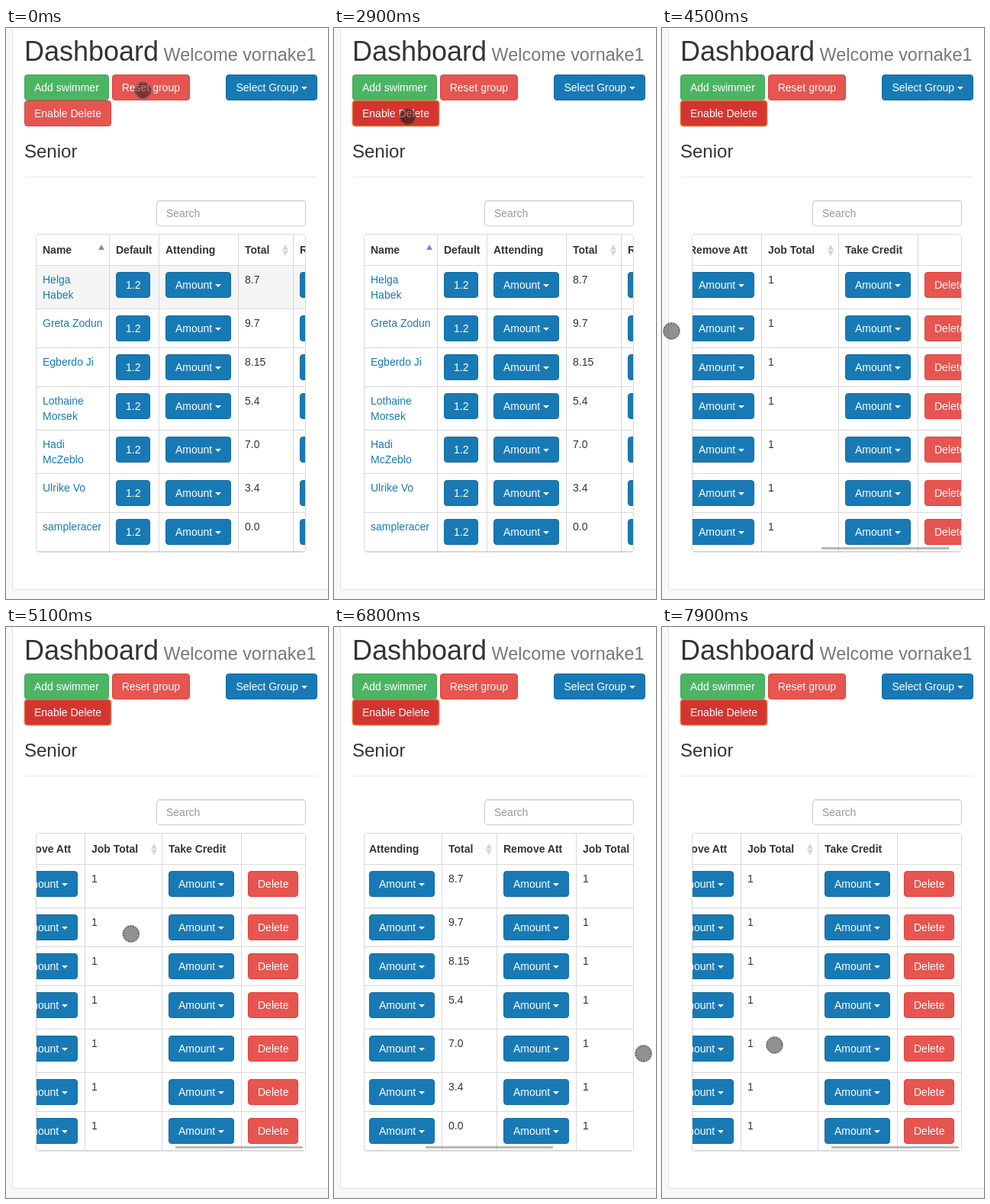
Recreate the animation shown at these times as an HTML page. Size 422x749 px, loop 8000 ms.

```html
<!DOCTYPE html>
<html lang="en">
<head>
<meta charset="utf-8">
<title>Dashboard</title>
<style>
  * { box-sizing: border-box; }
  html, body { margin: 0; width: 100%; height: 100%; overflow: hidden; background: #f8f8f8; }
  body { position: relative; font: 14px/20px "Liberation Sans", Arial, sans-serif; color: #333; }
  body > *, #table, #table > *, #thumb { position: absolute; }
  .page { left: 8px; top: -5px; width: 430px; height: 742px; background: #fff; border: 1px solid #e2e2e2; }
  h1, h3 { margin: 0; left: 24px; font-weight: 400; line-height: 1.1; white-space: nowrap; }
  h1 { top: 11.4px; font-size: 36px; }
  h1 small { font-size: 65%; line-height: 1; color: #777; }
  h3 { top: 149px; font-size: 24px; }
  .rule { left: 24px; top: 195px; width: 384px; height: 1px; background: #eaeaea; }
  .actions { left: 24px; top: 61px; width: 384px; }
  .search { left: 197px; top: 226px; width: 196px; height: 34px; padding: 6px 12px; border: 1px solid #ccc;
    border-radius: 4px; color: #999; box-shadow: inset 0 1px 1px rgba(0,0,0,.075); }
  .btn { display: inline-block; vertical-align: middle; height: 34px; padding: 6px 12px;
    border: 1px solid; border-radius: 4px; color: #fff; white-space: nowrap; }
  .right { float: right; }
  .green { background: #4bb563; border-color: #42a359; }
  .red { background: #e75550; border-color: #e2403b; }
  .blue { background: #187ab5; border-color: #146a9e; }
  .red.active { background: #d53530; border-color: #e0783c; box-shadow: 0 0 0 1px rgba(229,151,60,.5); }
  .caret { display: inline-block; vertical-align: middle;
    border: 4px solid transparent; border-top-color: #fff; border-bottom: 0; }
  .frame { left: 39px; top: 270px; width: 354px; height: 418px; border: 1px solid #d9d9d9; border-radius: 4px; overflow: hidden; }
  #table { left: 0; top: 0; width: 730px; height: 416px; }
  #hover { left: 0; top: 41px; width: 100%; height: 56px; background: #f5f5f5; }
  .row { left: 0; width: 100%; height: 1px; background: #d9d9d9; }
  .column { top: 0; width: 1px; height: 100%; background: #d9d9d9; }
  .text { white-space: nowrap; }
  .head { top: 10px; font-weight: 700; }
  .link { color: #187ab5; }
  .sort { border: 4.5px solid transparent; width: 0; height: 0; }
  .up { top: 13px; border-top: 0; border-bottom: 7px solid #d6d6d6; }
  .down { top: 21px; border-bottom: 0; border-top: 7px solid #d6d6d6; }
  .up.on { border-bottom-color: #668fd6; }
  #thumb { top: 410px; left: 0; width: 167px; height: 3px; background: rgba(128,128,128,.55); }
  #touch { left: 0; top: 0; }
</style>
</head>
<body>
<div class="page"></div>
<h1>Dashboard<small> Welcome vornake1</small></h1>
<div class="actions">
  <span class="btn blue right">Select Group <span class="caret"></span></span>
  <span class="btn green">Add swimmer</span>
  <span class="btn red">Reset group</span>
  <span class="btn red" id="enable">Enable Delete</span>
</div>
<h3>Senior</h3>
<div class="rule"></div>
<div class="search">Search</div>
<div class="frame">
  <div id="table"><div id="hover"></div></div>
  <div id="thumb"></div>
</div>
<svg id="touch" width="24" height="24" viewBox="-12 -12 24 24">
  <circle r="11.4" fill="#000" fill-opacity=".43"/>
  <circle r="10.3" fill="none" stroke="#fff" stroke-opacity=".3" stroke-width="1.6"/>
  <circle r="9.9" fill="none" stroke="#111" stroke-dasharray="1.8 1.66"/>
</svg>
<script>
const [table, hover, enable, thumb, touch] =
  ['table', 'hover', 'enable', 'thumb', 'touch'].map(id => document.getElementById(id));

function add(className, style, html = '') {
  const el = document.createElement('div');
  el.className = className;
  el.innerHTML = html;
  for (const side in style) el.style[side] = style[side] + 'px';
  table.append(el);
}

const swimmers = [
  ['Helga<br>Habek', '8.7'], ['Greta Zodun', '9.7'], ['Egberdo Ji', '8.15'], ['Lothaine<br>Morsek', '5.4'],
  ['Hadi<br>McZeblo', '7.0'], ['Ulrike Vo', '3.4'], ['sampleracer', '0.0']
];
const amount = 'Amount <span class="caret"></span>';
// column width, heading, cell class, cell content, sort arrows
const columns = [
  [96, 'Name', 'text link', s => s[0], ['up on']],
  [65, 'Default', 'btn blue', () => '1.2'],
  [104, 'Attending', 'btn blue', () => amount],
  [72, 'Total', 'text', s => s[1], ['up', 'down']],
  [104, 'Remove &zwnj;Att', 'btn blue', () => amount],
  [101, 'Job Total', 'text', () => '1', ['up', 'down']],
  [104, 'Take Credit', 'btn blue', () => amount],
  [84, '', 'btn red', () => 'Delete']
];

let edge = -1;
for (const [width, title, className, content, arrows = []] of columns) {
  const left = edge + 9;
  let top = 40;
  add('column', { left: edge });
  add('text head', { left }, title);
  for (const arrow of arrows) add('sort ' + arrow, { left: edge + width - 14 });
  for (const swimmer of swimmers) {
    add('row', { top });
    add(className, { left, top: top + 9 }, content(swimmer));
    top += swimmer[0].includes('<br>') ? 57 : 51;
  }
  add('row', { top });
  edge += width;
}

const clamp = (v, low, high) => Math.min(high, Math.max(low, v));
const maxScroll = 377;
const scrollLag = 115;

// straight finger moves after the opening arc: start, end, target x, target y
const moves = [
  [1400, 2200, 96.5, 116.5],
  [3200, 3800, 359.5, 379.5],
  [3900, 4400, 12.5, 397.5],
  [4500, 4800, 310, 400],
  [4800, 5300, 136, 403],
  [5400, 5800, 177.5, 512.5],
  [5800, 6300, 170, 556],
  [6300, 6800, 405.5, 559.5],
  [7200, 7500, 408.5, 557.5],
  [7500, 7900, 147.5, 548.5]
];
// start, end, sum of scroll offset and finger x
const drags = [[3900, 4500, 362.8], [4800, 5300, 660], [6300, 8000, 556]];

function finger(time) {
  const angle = -1.49 + 4.49 * clamp(time / 700, 0, 1);
  let x = 173.5 + 75 * Math.cos(angle), y = 148.5 + 67 * Math.sin(angle);
  for (const [start, end, toX, toY] of moves) {
    const eased = 1 - (1 - clamp((time - start) / (end - start), 0, 1)) ** 2;
    x += (toX - x) * eased;
    y += (toY - y) * eased;
  }
  return [x, y];
}

// the table trails the finger; its scrollbar fades once the finger lets go
function scrolling(time) {
  const drag = drags.filter(([start]) => start < time).pop();
  if (!drag) return [0, 0];
  const [, end, sum] = drag;
  const [x] = finger(Math.min(time, end) - scrollLag);
  return [clamp(sum - x, 0, maxScroll), clamp(1 - (time - end - 100) / 300, 0, 1)];
}

function draw(now) {
  const time = Math.floor(now % 8000 / 100) * 100;
  const [x, y] = finger(time);
  const [scroll, barOpacity] = scrolling(time);
  touch.style.transform = `translate(${x - 12}px, ${y - 12}px)`;
  table.style.left = -Math.round(scroll) + 'px';
  thumb.style.left = Math.round(2.3 + scroll * 0.477) + 'px';
  thumb.style.opacity = barOpacity;
  hover.hidden = time >= 2900;
  enable.classList.toggle('active', time >= 2900);
}

const start = performance.now();
(function tick() {
  draw(performance.now() - start);
  requestAnimationFrame(tick);
})();
</script>
</body>
</html>
```
